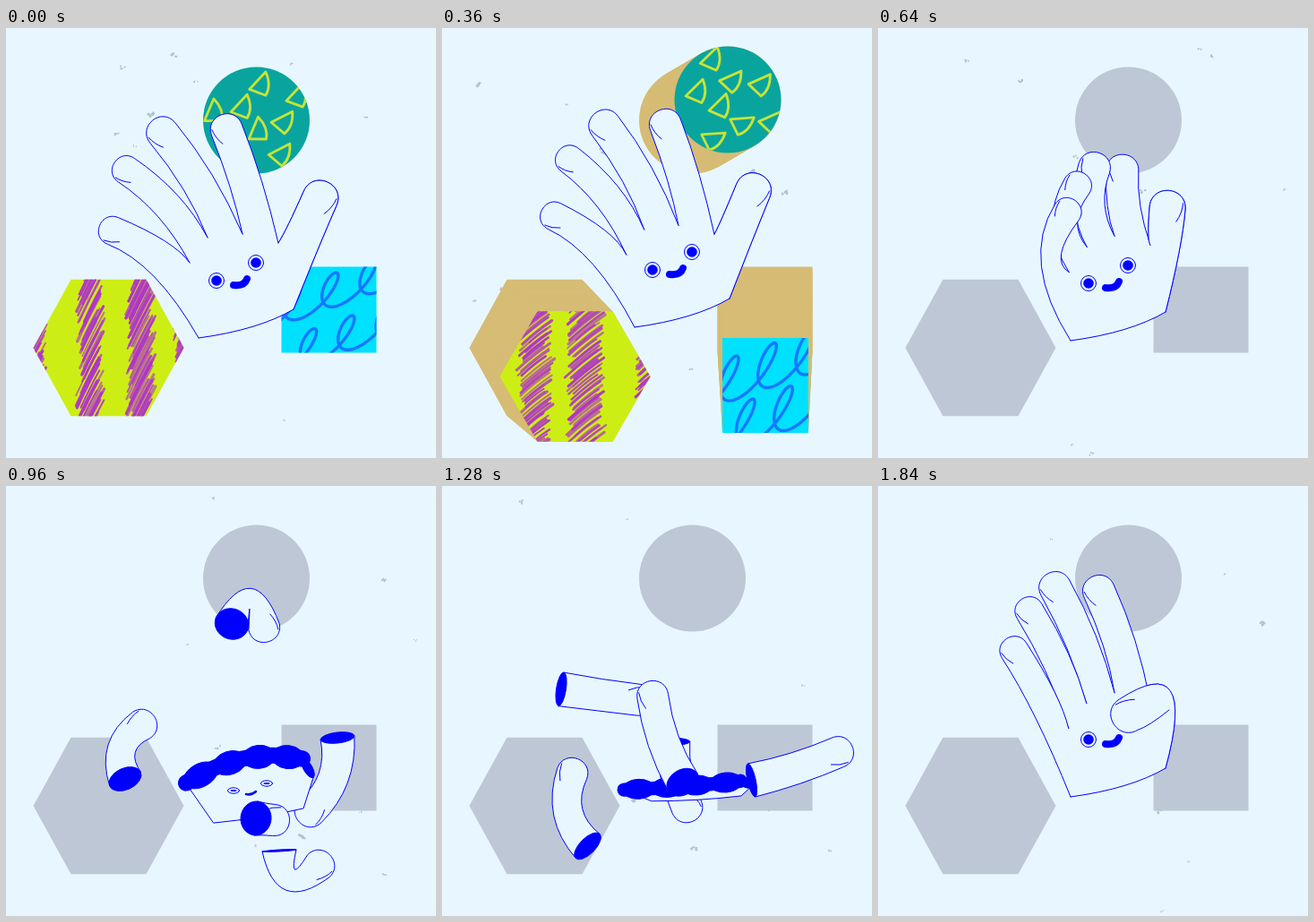
Recreate the animation shown at these times as an HTML page with a canvas. Size 480 by 480 pixels, loop 1920 ms.

```html
<!DOCTYPE html>
<html lang="en">
<head>
<meta charset="utf-8">
<title>Tumbling hand</title>
<style>
html, body { margin: 0; width: 100%; height: 100%; overflow: hidden; background: #e8f7ff; }
canvas { display: block; width: 100vw; height: 100vh; }
</style>
</head>
<body>
<canvas id="stage" width="480" height="480"></canvas>
<script>
const LOOP = 1920, LOOSE = 720, JOINED = 1740;
const PAPER = '#e8f7ff', INK = '#0000ff', GREY = '#bec7d6', TAN = '#d6bc74';
const c = document.getElementById('stage').getContext('2d');
const lerp = (a, b, u) => a + (b - a) * u;
const mixAll = (a, b, u) => a.map((v, i) => lerp(v, b[i], u));
const smooth = u => u * u * (3 - 2 * u);

function random(seed) {
  let s = (seed * 2654435761) >>> 0;
  return () => {
    s = (s + 0x6D2B79F5) >>> 0;
    let t = Math.imul(s ^ s >>> 15, s | 1);
    t ^= t + Math.imul(t ^ t >>> 7, t | 61);
    return ((t ^ t >>> 14) >>> 0) / 4294967296;
  };
}

function between(keys, t) {
  let i = 0;
  while (i < keys.length - 2 && t >= keys[i + 1][0]) i++;
  const [t0, a] = keys[i], [t1, b] = keys[i + 1];
  return [a, b, Math.min(1, (t - t0) / (t1 - t0))];
}

function paint(fill, stroke, width = 1) {
  if (fill) { c.fillStyle = fill; c.fill(); }
  if (stroke) { c.strokeStyle = stroke; c.lineWidth = width; c.stroke(); }
}

function disk([x0, y0], [x1, y1], ry, extra = 0) {
  const rx = Math.hypot(x1 - x0, y1 - y0) / 2 + extra;
  c.beginPath();
  c.ellipse((x0 + x1) / 2, (y0 + y1) / 2, rx, ry, Math.atan2(y1 - y0, x1 - x0), 0, 7);
  paint(INK, INK);
}

// Fingers run from little finger to thumb, fanned around the palm.
const fan = [194, 219, 239, 264, 321], reach = [147, 164, 169, 149, 114], radius = [16, 16, 18, 18, 20];
const knuckles = [[205, 262], [225, 234], [264, 230], [304, 240]];

// Pose: rise, pull towards a focus angle, reach and its step, bend and its step, thumb fold
const open = [0, 0, 300, 1, 0, 20, -5, 0];
const wave = [-12, 0.03, 300, 0.97, 0, 20, -5, 0];
const curl = [3, 0.33, 300, 0.53, 0.06, -38, 10, 0];
const tucked = [1, 0.31, 264, 0.92, 0.02, 8, 0, 1];
const poses = [[0, open], [360, wave], [640, curl], [LOOSE, curl]];

// A finger is [base x, base y, tip x, tip y, bend, depth of cut end].
function handShape([rise, pull, focus, size, sizeStep, bend, bendStep, fold]) {
  const left = [215, 346 + rise], right = [321, 314 + rise];
  const joints = knuckles.map(([x, y], i) => {
    const shift = i < 2 ? 25 * pull : 0;
    return [x + shift, y + shift + rise * 0.8];
  });
  const fingers = fan.map((angle, i) => {
    const thumb = i === 4, a = lerp(angle, focus, pull) * Math.PI / 180, r = reach[i] * (size + sizeStep * i);
    let tip = [262 + r * Math.cos(a), 262 + rise * 0.8 + r * Math.sin(a)], arc = bend + bendStep * i;
    let from = i ? joints[i - 1] : left, to = thumb ? right : joints[i];
    if (thumb) {
      tip = mixAll(tip, [280, 255], fold);
      from = mixAll(from, [325, 250], fold);
      arc = lerp(arc, 52, fold);
    }
    const base = mixAll(from, to, 0.5);
    return { bone: [...base, ...tip, arc, 3], ends: [from, to], puff: thumb ? 1 + 1.6 * fold : 1 };
  });
  return { left, right, joints, fingers };
}

const bonesOf = pose => handShape(pose).fingers.map(f => f.bone);
const burst = [[252, 154, 288, 157, -60, 17], [133, 327, 151, 267, -27, 12], [370, 281, 340, 363, -22, 6],
  [279, 371, 299, 373, 0, 17], [305, 407, 349, 424, 52, 1]];
const flip = [[189, 217, 243, 171, -12, 7], [165, 391, 136, 301, -29, 14], [291, 265, 285, 322, 0, 6],
  [253, 283, 225, 183, -6, 18], [380, 424, 431, 325, 18, 1]];
const land = [[107, 236, 126, 346, 20, 3], [161, 417, 157, 352, -24, 1], [200, 325, 263, 403, 20, 1],
  [292, 402, 251, 313, -17, 8], [348, 188, 404, 253, -15, 10]];
const flight = [[LOOSE, bonesOf(curl)], [960, burst], [1120, flip], [1520, land], [JOINED, bonesOf(tucked)]];

// Loose palm: centre of the cut edge, its slope, body height, depth of cut, bulge
const palms = [[LOOSE, [254, 250, -24, 80, 4, 4]], [960, [266, 318, -27, 50, 13, 14]],
  [1120, [269, 349, -7, -23, 15, 0]], [1520, [267, 312, -14, 71, 5, -3]], [JOINED, [254, 245, -30, 80, 4, 4]]];

// Blend position, heading and length apart, so that loose pieces tumble.
function tumble(f, g, u) {
  const polar = ([x, y, tx, ty, bend, depth]) =>
    [(x + tx) / 2, (y + ty) / 2, Math.hypot(tx - x, ty - y) / 2, bend, depth];
  const heading = ([x, y, tx, ty]) => Math.atan2(ty - y, tx - x);
  const [x, y, half, bend, depth] = mixAll(polar(f), polar(g), u);
  const a = heading(f), d = heading(g) - a;
  const turn = a + Math.atan2(Math.sin(d), Math.cos(d)) * u;
  const dx = half * Math.cos(turn), dy = half * Math.sin(turn);
  return [x - dx, y - dy, x + dx, y + dy, bend, depth];
}

const side = ([x, y], [nx, ny], d) => [x + nx * d, y + ny * d];
function normal([x0, y0], [x1, y1]) {
  const len = Math.hypot(x1 - x0, y1 - y0) || 1;
  return [(y0 - y1) / len, (x1 - x0) / len];
}

function finger(bone, r, mirrored, ends, puff = 1) {
  const base = bone.slice(0, 2), tip = bone.slice(2, 4), [bend, depth] = bone.slice(4);
  const n = normal(base, tip), elbow = side(mixAll(base, tip, 0.5), n, bend);
  const nBase = normal(base, elbow), nTip = normal(elbow, tip);
  const [from, to] = ends || [side(base, nBase, -19), side(base, nBase, 19)];
  const p = side(tip, nTip, -r), q = side(tip, nTip, r);
  const out = [nTip[1], -nTip[0]];
  c.beginPath();
  c.moveTo(...from);
  c.quadraticCurveTo(...side(elbow, n, -r * puff), ...p);
  c.bezierCurveTo(...side(p, out, r * 4 / 3), ...side(q, out, r * 4 / 3), ...q);
  c.quadraticCurveTo(...side(elbow, n, r * puff), ...to);
  paint(PAPER, INK);
  const crease = (u, v) => side(side(tip, nTip, (mirrored ? u : -u) * r), out, v * r);
  c.beginPath();
  c.moveTo(...crease(0.85, 0.35));
  c.quadraticCurveTo(...crease(0.85, -0.2), ...crease(0.55, -0.7));
  paint(null, INK);
  if (!ends) disk(from, to, depth);
  return elbow;
}

function eye(x, y, wide) {
  c.beginPath();
  c.ellipse(x, y, lerp(6.5, 8.5, wide), lerp(3.2, 8.5, wide), 0, 0, 7);
  paint(PAPER, INK);
  c.beginPath();
  c.ellipse(x, y, lerp(3.5, 5.8, wide), lerp(1, 5.8, wide), 0, 0, 7);
  paint(INK);
}

function face(x, y, wide) {
  eye(x, y, wide);
  eye(x + lerp(37, 44, wide), y - lerp(8, 20, wide), wide);
  const mx = x + lerp(14, 19, wide), my = y + lerp(4, 5, wide);
  c.beginPath();
  c.moveTo(mx, my);
  c.quadraticCurveTo(mx + lerp(6, 12, wide), my + 1.5, mx + lerp(11, 15, wide), my - lerp(3, 7, wide));
  paint(null, INK, lerp(2.5, 8, wide));
}

function joinedHand(pose) {
  const { left, right, joints, fingers } = handShape(pose);
  const wrist = () => {
    const [x, y] = mixAll(left, right, 0.5);
    c.quadraticCurveTo(x + 14, y + 7, ...left);
  };
  const draw = i => finger(fingers[i].bone, radius[i], i === 4, fingers[i].ends, fingers[i].puff);
  const elbow = draw(4);
  c.beginPath();
  [left, ...joints, elbow, right].forEach(p => c.lineTo(...p));
  wrist();
  paint(PAPER);
  c.beginPath();
  c.moveTo(...right);
  wrist();
  paint(null, INK);
  face(left[0] + 20, left[1] - 64, 1);
  [3, 2, 1, 0, 4].forEach(draw);
}

function loosePalm(t) {
  const [x, y, slope, body, depth, bulge] = mixAll(...between(palms, t));
  const a = [x - 65, y - slope / 2], b = [x + 65, y + slope / 2], top = [x, y - 2 * bulge];
  const heel = [b[0] + 12, b[1] + body * 0.42];
  const wristRight = [x + 66, y + body + slope * 0.3], wristLeft = [x - 34, y + body - slope * 0.3];
  c.beginPath();
  c.moveTo(...a);
  c.quadraticCurveTo(...top, ...b);
  c.lineTo(...heel);
  c.lineTo(...wristRight);
  c.quadraticCurveTo(x + 18, y + body + 3, ...wristLeft);
  c.closePath();
  paint(PAPER, INK);
  c.beginPath();
  c.moveTo(...a);
  c.quadraticCurveTo(...top, ...b);
  paint(null, INK, depth * 1.4);
  const along = u => mixAll(mixAll(a, top, u), mixAll(top, b, u), u);
  for (let i = 0; i < 4; i++) disk(along(i / 4), along((i + 1) / 4), depth, 2);
  disk(b, heel, depth * 0.38);
  if (t < 1040) {
    const u = (t - LOOSE) / 240;
    face(lerp(235, 254, u), lerp(285, 340, u), Math.max(0, 1 - u));
  }
}

function looseHand(t) {
  const [a, b, u] = between(flight, t);
  const draw = i => finger(tumble(a[i], b[i], u), 17.5, i === 4);
  const behind = t < 1320;
  if (behind) draw(2);
  loosePalm(t);
  if (!behind) draw(2);
  [1, 0, 3, 4].forEach(draw);
}

function hand(t) {
  if (t >= JOINED) return joinedHand(tucked);
  if (t >= LOOSE) return looseHand(t);
  const [a, b, u] = between(poses, t);
  joinedHand(mixAll(a, b, smooth(u)));
}

function scribble(k, rnd) {
  for (const [dx, half] of [[-80, 9], [-20, 14], [36, 16], [82, 9]]) {
    for (let y = -90; y < 90; y += 3.4) {
      const w = (half + 5 * k) * (0.5 + 0.5 * rnd()), h = w * lerp(2, 0.8, k);
      const x = dx - (dx < 80 ? 24 * k : 0) + (rnd() - 0.5) * 6;
      c.beginPath();
      c.moveTo(x - w, y + h);
      c.quadraticCurveTo(x, y - 2, x + w, y - h);
      c.globalAlpha = 0.6 + 0.4 * rnd();
      paint(null, '#b136c8', 1.5 + rnd() * 2);
    }
  }
  c.globalAlpha = 1;
}

function loops(k) {
  for (let row = 0; row < 2; row++) {
    c.beginPath();
    for (let a = -9; a < 16; a += 0.15) {
      const u = a * 5.8 - 20 + Math.sin(a) * 14;
      const v = Math.cos(a) * lerp(22, 28, k) - u * 0.4;
      c.lineTo(u - v * 0.4 + row * 18, v - 20 + row * 48);
    }
    paint(null, '#1478ff', 3.4);
  }
}

function triangles(k) {
  for (let i = 0; i < 8; i++) {
    const r = 56 * Math.sqrt((i + 0.3) / 8), a = i * 2.4 + 1.5 + k;
    c.save();
    c.translate(r * Math.cos(a), r * Math.sin(a));
    c.rotate(i % 3 * 0.35 - 0.2 + k * 0.4);
    c.beginPath();
    c.moveTo(4, -14);
    c.quadraticCurveTo(13, 0, 8, 12);
    c.lineTo(-11, 8);
    c.closePath();
    paint(null, '#c5e436', 2.8);
    c.restore();
  }
}

function hexagon(k) {
  c.beginPath();
  for (let a = 0; a < 6; a++) c.lineTo(84 * Math.cos(a * Math.PI / 3), lerp(88, 84, k) * Math.sin(a * Math.PI / 3));
  c.closePath();
}

function box(k) {
  const w = lerp(53, 48, k), h = lerp(48, 53, k);
  c.beginPath();
  c.rect(-w, -h, 2 * w, 2 * h);
}

function ball() {
  c.beginPath();
  c.arc(0, 0, 59.5, 0, 7);
}

const solids = [
  { at: [114.5, 357], move: [34, 32], trace: hexagon, colour: '#cdee14', pattern: scribble },
  { at: [360.5, 314.5], move: [0.5, 84.5], trace: box, colour: '#00e0ff', pattern: loops },
  { at: [279.5, 103], move: [39.5, -23], trace: ball, colour: '#0aa49f', pattern: triangles }
];

function shapes(t) {
  const lively = t < 600;
  const k = lively ? Math.sin(Math.PI * t / 600) / Math.sin(Math.PI * 0.6) : 0;
  const rnd = random(Math.floor(t / 120) + 5);
  for (const { at, move, trace, colour, pattern } of solids) {
    const place = u => {
      c.setTransform(1, 0, 0, 1, ...side(at, move, u));
      trace(u);
    };
    c.save();
    if (k > 0) for (let i = 0; i <= 40; i++) { place(k * i / 40); paint(TAN); }
    place(k);
    paint(lively ? colour : GREY);
    if (lively) { c.clip(); pattern(k, rnd); }
    c.restore();
  }
}

function specks(t) {
  c.fillStyle = '#b5c2cc';
  for (let i = 0; i < 11; i++) {
    const rnd = random(i * 97 + Math.floor((t + i * 60) / 240) * 13 + 1);
    const x = 12 + rnd() * 455, y = 10 + rnd() * 468, size = 1 + rnd() * rnd() * 3;
    for (let j = 0; j < 4; j++) {
      c.beginPath();
      c.ellipse(x + (rnd() - 0.5) * size * 3, y + (rnd() - 0.5) * size * 2, size * 0.7, size * 0.5, rnd() * 3, 0, 7);
      c.fill();
    }
  }
}

// The drawing runs partly on short and partly on doubled exposures.
function exposure(t) {
  const short = t < 720 || (t >= 1200 && t < 1360) || (t >= 1760 && t < 1840);
  const step = short ? 40 : 80;
  return Math.floor(t / step) * step;
}

function draw(t) {
  c.fillStyle = PAPER;
  c.fillRect(0, 0, 480, 480);
  specks(t);
  shapes(t);
  hand(t);
}

c.lineCap = c.lineJoin = 'round';
const start = performance.now();
let last = -1;
function tick() {
  const t = exposure((performance.now() - start) % LOOP);
  if (t !== last) draw(last = t);
  requestAnimationFrame(tick);
}
tick();
</script>
</body>
</html>
```
